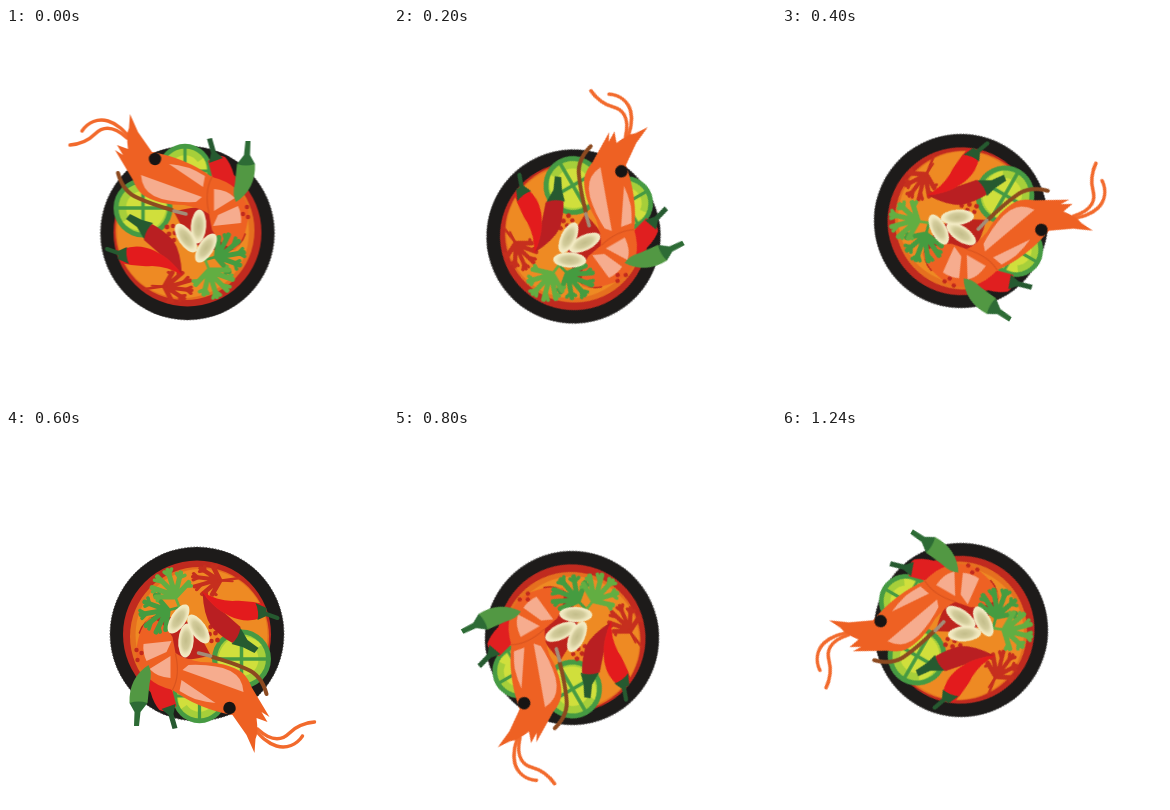
Animation of 382x374 px, one loop 1.4 s. Source, as an HTML page:

```html
<!DOCTYPE html>
<html lang="en">
<head>
<meta charset="utf-8">
<title>Spinning soup bowl</title>
<style>
  html, body { margin: 0; width: 100%; height: 100%; overflow: hidden; background: #fff; }
  svg { display: block; width: 382px; height: 374px; }
  .bowl { animation: turn 1400ms step-end infinite; }
  /* sixth-turn jumps with a small wobble of the centre */
  @keyframes turn {
    0%       { transform: translate(181.5px, 205px) rotate(0deg); }
    14.2857% { transform: translate(179.5px, 208.5px) rotate(60deg); }
    28.5714% { transform: translate(179px, 193px) rotate(120deg); }
    42.8571% { transform: translate(191px, 204px) rotate(180deg); }
    57.1429% { transform: translate(178px, 208px) rotate(240deg); }
    71.4286%, 100% { transform: translate(179px, 200px) rotate(300deg); }
  }
  .line { fill: none; stroke-linecap: round; stroke-linejoin: round; }
  .pink { fill: #f6ac8e; }
  .stem { fill: #265a30; }
</style>
</head>
<body>
<svg viewBox="0 0 382 374">
  <defs>
    <radialGradient id="seed">
      <stop offset="0" stop-color="#c3bd8a"/>
      <stop offset=".5" stop-color="#d2cb9a"/>
      <stop offset=".8" stop-color="#eee6bd"/>
      <stop offset="1" stop-color="#f4edc8"/>
    </radialGradient>
    <g id="lime">
      <circle r="29.5" fill="#469a43"/>
      <circle r="24.5" fill="#a6cf3a"/>
      <path d="M-20 14A24.5 24.5 0 0 0 20 -14Z" fill="#d0df3c"/>
      <circle r="17" fill="#d0df3c"/>
      <path class="line" stroke="#469a43" stroke-width="3.5" d="M-25 0H25M0 -25V25"/>
    </g>
    <!-- leaf fan: base at the origin, opening to the right -->
    <g id="leaf" class="line" stroke="currentColor">
      <path stroke-width="2.6" d="M-4 0L14 0"/>
      <path stroke-width="5" d="M9 -1L16 -18M12 -2L26 -18M13 0L34 -9M13 1L36 3M12 2L29 14M9 1L17 18"/>
      <path stroke-width="3.6" d="M15 -15L12 -18M22 -13L22 -19M28 -7L32 -13M31 2L36 -1M31 2L36 7M25 11L30 10M25 11L25 17M15 14L13 19"/>
    </g>
  </defs>

  <g class="bowl"><g transform="translate(-181.5 -205)">
    <circle cx="181.5" cy="205" r="87" fill="#1d1b1a"/>
    <circle class="line" cx="181.5" cy="205" r="87" stroke="#4b4947" stroke-width="1" stroke-dasharray=".5 2.6"/>
    <circle cx="181.5" cy="204.5" r="74" fill="#c02a1f"/>
    <circle cx="179" cy="202.500" r="69.5" fill="#e5701f"/>
    <circle cx="177" cy="204" r="66" fill="#ee8a23"/>

    <use href="#lime" transform="translate(179 143) scale(.92)"/>
    <use href="#lime" transform="translate(137 180)"/>

    <!-- red chili at the rim -->
    <path d="M202 133Q210 125 219 129Q230 141 231 171Q214 162 206 148Z" fill="#e01f20"/>
    <path class="stem" d="M201 111L206 110L210 124L217 130L203 135L205 125Z"/>

    <!-- curl of the tail -->
    <path d="M168 184Q190 176 212 182L240 206Q236 219 222 224Q200 222 184 214Z" fill="#bd241d"/>

    <path class="line" stroke="#8c4a20" stroke-width="4" d="M112 145Q117 164 132 170Q145 176 166 182"/>
    <path class="line" stroke="#a28d78" stroke-width="3.5" d="M168 183L180 186"/>

    <!-- shrimp -->
    <g class="line" stroke="#f26a2c" stroke-width="3.4">
      <path d="M64 117C76 116 83 112 89 106C98 97 109 99 121 110"/>
      <path d="M76 103C82 94 92 90 102 93C112 96 118 103 124 110"/>
    </g>
    <path fill="#ee6123" d="M124 86L132 104L146 124Q180 130 206 149Q235 156 242 181Q243 206 229 222Q214 217 206 202L203 186Q195 180 178 177Q152 177 137 167Q130 161 127 152L109 122L117 127L111 117L122 121Q120 106 123 100Z"/>
    <path class="line" stroke="#d9541f" stroke-width="1.2" d="M206 149Q198 164 203 185"/>
    <path class="pink" d="M135 147L196 169L190 174Q162 175 148 168Q136 162 135 147ZM163 136Q182 137 199 148L197 159Z"/>
    <path class="pink" d="M208 161Q222 162 229 170L208 183ZM232 178Q236 186 235 195L207 198L212 187Z"/>
    <circle cx="149" cy="131" r="6.2" fill="#171514"/>

    <!-- green chili -->
    <path d="M231 136Q241 130 249 136Q250 161 230 174Q226 167 229 155Z" fill="#529843"/>
    <path d="M239.500 113H244.500L244 127L249 136Q240 139 231 136L238 127Z" fill="#2d6b35"/>

    <g fill="#c1291d">
      <circle cx="161" cy="199" r="2.4"/><circle cx="167" cy="198" r="2.2"/>
      <circle cx="169" cy="205" r="2.4"/><circle cx="163" cy="206" r="2.4"/>
      <circle cx="168" cy="212" r="2.2"/><circle cx="241" cy="179" r="2.2"/>
      <circle cx="237" cy="186" r="2.2"/><circle cx="242" cy="189" r="2.2"/>
    </g>

    <use href="#leaf" color="#c62f1e" transform="translate(150 258) rotate(3) scale(.98 .8)"/>
    <path class="line" stroke="#c62f1e" stroke-width="2.6" d="M139 261L160 258"/>

    <!-- chilies in the soup -->
    <path d="M138 212Q138 201 146 196Q157 202 167 212Q175 224 176 247Q166 233 154 226Z" fill="#b91f22"/>
    <path class="stem" d="M120 191L124 186L136 192L147 195Q140 201 138 211L131 199Z"/>
    <path d="M117 221Q133 215 149 223Q166 231 177 248Q162 238 146 238Q130 239 115 235Z" fill="#e31b1d"/>
    <path class="line" stroke="#265a30" stroke-width="4" d="M101 221L115 226"/>
    <path class="stem" d="M112 223L121 219Q119 227 123 236L112 231Z"/>

    <!-- herbs -->
    <use href="#leaf" color="#459c40" transform="translate(202 231) rotate(-15)"/>
    <use href="#leaf" color="#62ae42" transform="translate(200 234) rotate(68)"/>

    <!-- seeds -->
    <g fill="url(#seed)">
      <ellipse rx="7.7" ry="17" transform="translate(192.500 198.500) rotate(4)"/>
      <ellipse rx="7.7" ry="16.500" transform="translate(180 210) rotate(-34)"/>
      <ellipse rx="7.7" ry="16.500" transform="translate(200 220) rotate(32)"/>
    </g>
  </g></g>
</svg>
</body>
</html>
```
